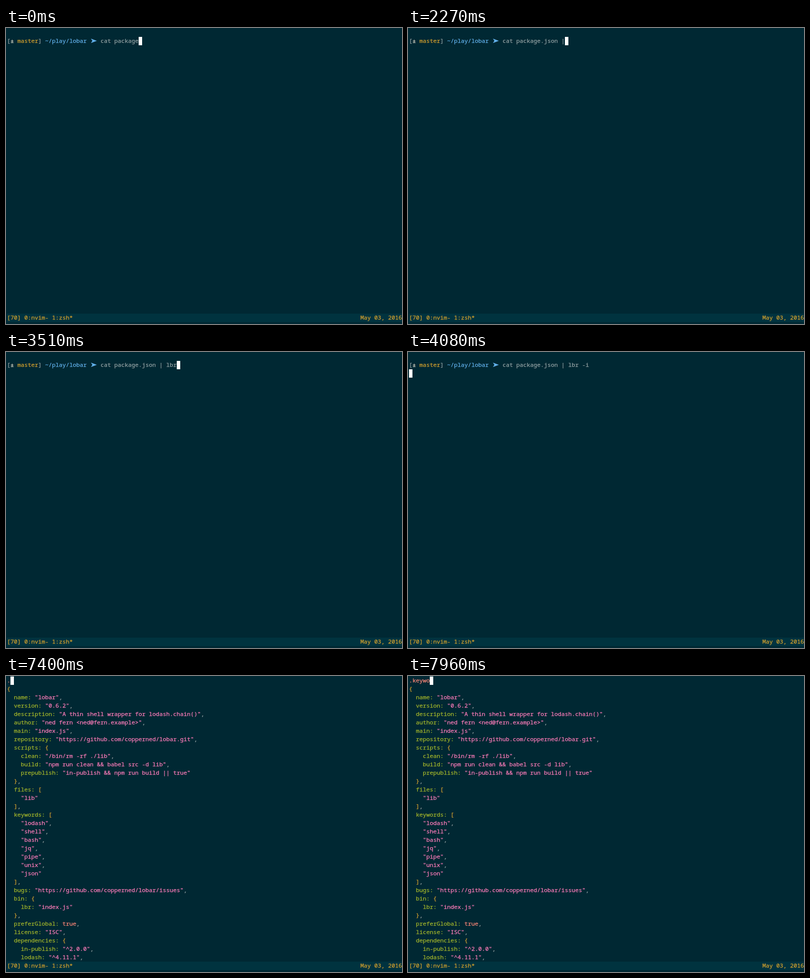
Write an HTML page that moves like this. It is 800 px wide and 600 px high and loops after 8 s.

```html
<!DOCTYPE html>
<html lang="en">
<head>
<meta charset="utf-8">
<title>Terminal session</title>
<style>
  html, body { margin: 0; width: 100%; height: 100%; overflow: hidden; background: #002833; }
  pre, svg, #cursor, #status { position: absolute; margin: 0; }
  pre, #status {
    font: 500 11.6667px/17px "Noto Sans Mono", "DejaVu Sans Mono", monospace;
    font-variant-ligatures: none;
    -webkit-text-stroke: .25px;
    color: #93a1a3;
    white-space: pre;
  }
  pre { left: 2px; top: 0; }
  #shell { top: 17px; }
  #status { left: 2px; top: 579px; width: 798px; height: 17px; background: #00333f; color: #d5a12e; }
  #status span { position: absolute; top: -1px; left: 0; }
  #status span + span { left: auto; right: 0; }
  #cursor { width: 7px; height: 17px; background: #fff; }
  svg { left: 168px; top: 4px; }
  .yellow { color: #d5a12e; }
  .blue { color: #62b0ea; }
  .white { color: #eee8d5; }
  .green { color: #a3b52b; }
  .pink { color: #ff7cba; }
  .red { color: #ff8778; }
</style>
</head>
<body>
<pre id="shell">[<span class="white">±</span> <span class="yellow">master</span>] <span class="blue">~/play/lobar</span>    <span id="command"></span><svg width="14" height="10"><path d="M1.5 .5L13.5 5L1.5 9.5L4.5 5Z" fill="#62b0ea"/></svg></pre>
<pre id="viewer"><span id="query" class="red"></span>
<span id="json"></span></pre>
<div id="status"><span>[70] 0:nvim- 1:zsh*</span><span>May 03, 2016</span></div>
<div id="cursor"></div>
<script>
const LOOP = 8000, CELL = 7, ROW = 17, PROMPT = 27;
const ENTER = 4080, OPEN = 4550;
const commandTimes = [2270, 2870, 3110, 3220, 3400, 3515, 3630, 3810];
const queryTimes = [7400, 7550, 7650, 7755, 7860, 7960];

const doc = `{
  name: "lobar",
  version: "0.6.2",
  description: "A thin shell wrapper for lodash.chain()",
  author: "ned fern <ned@fern.example>",
  main: "index.js",
  repository: "https://github.com/copperned/lobar.git",
  scripts: {
    clean: "/bin/rm -rf ./lib",
    build: "npm run clean && babel src -d lib",
    prepublish: "in-publish && npm run build || true"
  },
  files: [
    "lib"
  ],
  keywords: [
    "lodash",
    "shell",
    "bash",
    "jq",
    "pipe",
    "unix",
    "json"
  ],
  bugs: "https://github.com/copperned/lobar/issues",
  bin: {
    lbr: "index.js"
  },
  preferGlobal: true,
  license: "ISC",
  dependencies: {
    in-publish: "^2.0.0",
    lodash: "^4.11.1",`;

const $ = id => document.getElementById(id);
const escape = s => s.replace(/&/g, "&amp;").replace(/</g, "&lt;");

function colorOf(token) {
  if (token[0] === '"') return "pink";
  if (token.endsWith(":")) return "green";
  return token === "true" ? "red" : "yellow";
}

$("json").innerHTML = doc.replace(/"[^"]*"|[\w-]+:|true|[{}[\]]/g,
  token => `<span class="${colorOf(token)}">${escape(token)}</span>`);

const typed = (text, times, t) => text.slice(0, times.filter(at => at <= t).length);

function setCursor(col, row) {
  $("cursor").style.left = 2 + col * CELL + "px";
  $("cursor").style.top = 1 + row * ROW + "px";
}

function render(t) {
  const open = t >= OPEN;
  $("shell").style.display = open ? "none" : "block";
  $("viewer").style.display = open ? "block" : "none";
  const command = "cat package" + (t < 50 ? "" : ".json ") + typed("| lbr -i", commandTimes, t);
  const query = typed(".keywo", queryTimes, t);
  $("command").textContent = command;
  $("query").textContent = query;
  if (open) setCursor(query.length, 0);
  else if (t >= ENTER) setCursor(0, 2);
  else setCursor(PROMPT + command.length, 1);
}

const start = performance.now();
function frame() {
  render((performance.now() - start) % LOOP);
  requestAnimationFrame(frame);
}
frame();
</script>
</body>
</html>
```
